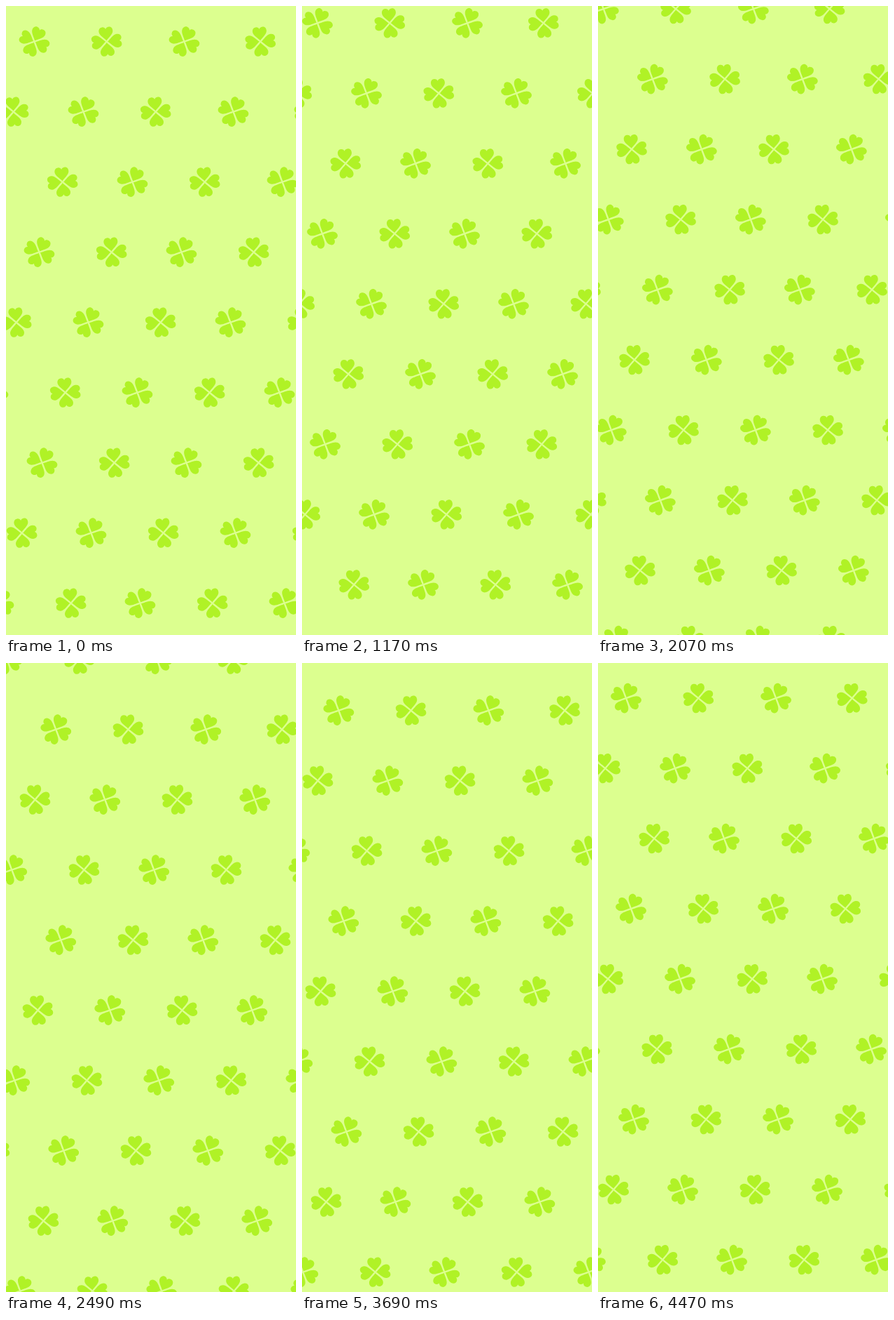
These frames come from a looping animation (414 by 896 pixels, 4500 ms). An HTML page with a canvas:

```html
<!DOCTYPE html>
<html lang="en">
<head>
<meta charset="utf-8">
<title>Drifting clovers</title>
<style>
  html, body { margin: 0; width: 100%; height: 100%; overflow: hidden; background: #dcff8f; }
  canvas { display: block; }
</style>
</head>
<body>
<canvas width="414" height="896"></canvas>
<script>
const LOOP = 4500;
const ROWS = 10, ROW_STEP = 100, ROW_SHIFT = 70, TOP = 50.7;
const SPEED_X = -0.01575, SPEED_Y = -0.0225; // px per ms
// Diagonal columns, given by their x in the first row; the two tilts alternate.
const COLUMNS = [363.2, 254.5, 143.7, 40.5, -59.3, -162.5, -265.3, -368.5, -467.3, -570.5];
const TILTS = [-5, 25];

const ctx = document.querySelector('canvas').getContext('2d');

const leaf = new Path2D(
  'M0-1.5C2.4-4.7 9.8-9.8 9.8-15C9.8-19 7.4-21 4.8-21C2.3-21 .5-19.5 0-17.8' +
  'C-.5-19.5-2.3-21-4.8-21C-7.4-21-9.8-19-9.8-15C-9.8-9.8-2.4-4.7 0-1.5Z');

function makeClover(tilt) {
  const clover = new Path2D();
  for (let i = 0; i < 4; i++) {
    clover.addPath(leaf, new DOMMatrix().rotate(tilt).scale(1.02, 0.99).rotate(i * 90));
  }
  return clover;
}
const clovers = TILTS.map(makeClover);

function draw(time) {
  const t = time % LOOP;
  ctx.setTransform(1, 0, 0, 1, 0, 0);
  ctx.fillStyle = '#dcff8f';
  ctx.fillRect(0, 0, 414, 896);
  ctx.fillStyle = '#b0f226';
  for (let row = 0; row < ROWS; row++) {
    const y = TOP + row * ROW_STEP + SPEED_Y * t;
    COLUMNS.forEach((start, i) => {
      const x = start + row * ROW_SHIFT + SPEED_X * t;
      if (x < -25 || x > 439) return;
      ctx.setTransform(1, 0, 0, 1, x, y);
      ctx.fill(clovers[i % 2]);
    });
  }
}

const begin = performance.now();
function tick() {
  draw(performance.now() - begin);
  requestAnimationFrame(tick);
}
tick();
</script>
</body>
</html>
```
